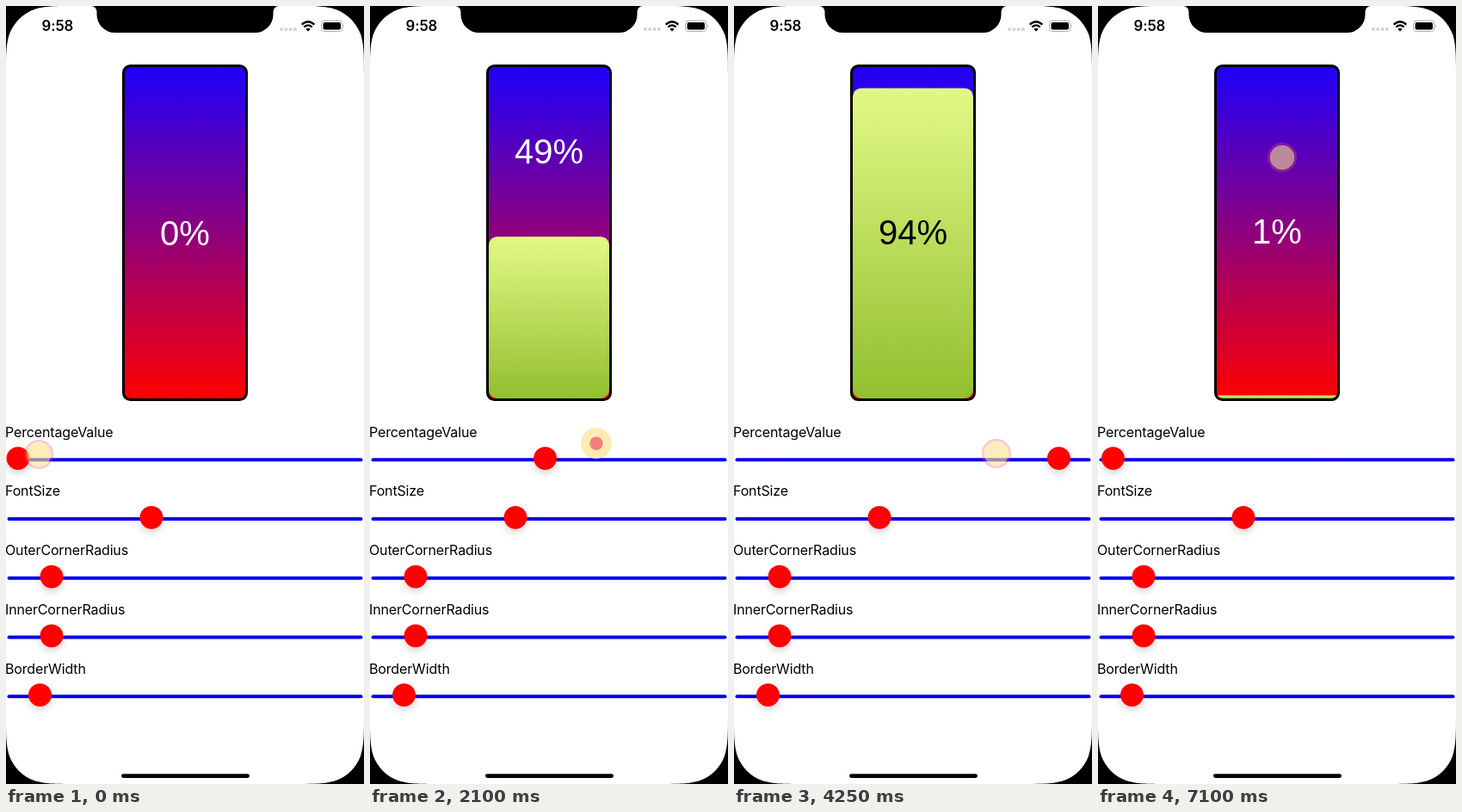
An HTML page for the animation above (7.15 s loop, 416 px wide and 904 px high).

```html
<!DOCTYPE html>
<html lang="en">
<head>
<meta charset="utf-8">
<title>Percentage slider</title>
<style>
html, body { margin: 0; width: 100%; height: 100%; overflow: hidden; background: #fff; }
svg { display: block; width: 416px; height: 904px; }
.label { font: 400 16px Inter, sans-serif; letter-spacing: -0.15px; }
.clock { font: 600 16.8px Inter, sans-serif; letter-spacing: -0.1px; }
#value { font: 400 40px "Liberation Sans", Arial, sans-serif; text-anchor: middle; }
</style>
</head>
<body>
<svg viewBox="0 0 416 904">
  <defs>
    <linearGradient id="back" x2="0" y2="1">
      <stop stop-color="#1e00fa"/><stop offset="1" stop-color="#ff0000"/>
    </linearGradient>
    <linearGradient id="front" x2="0" y2="1">
      <stop stop-color="#e2f985"/><stop offset="1" stop-color="#92bf2f"/>
    </linearGradient>
    <filter id="shadow" x="-60%" y="-60%" width="220%" height="220%">
      <feDropShadow dx="0" dy="4" stdDeviation="4" flood-opacity=".17"/>
    </filter>
    <clipPath id="inside"><rect x="138" y="71" width="140" height="385" rx="6"/></clipPath>
    <path id="corner" d="M0 0H79.500C56.600 0 45.200 0 32.800 3.900C19.400 8.800 8.800 19.400 3.900 32.800C0 45.200 0 56.600 0 79.500Z"/>
  </defs>

  <rect width="416" height="904" fill="#fff"/>
  <use href="#corner"/>
  <use href="#corner" transform="translate(416 0) scale(-1 1)"/>
  <use href="#corner" transform="translate(0 904) scale(1 -1)"/>
  <use href="#corner" transform="translate(416 904) scale(-1 -1)"/>
  <path d="M99 0A6.500 6.500 0 0 1 105.500 6.500V10A21 21 0 0 0 126.500 31H289.500A21 21 0 0 0 310.500 10V6.500A6.500 6.500 0 0 1 317 0Z"/>

  <text class="clock" x="41.500" y="29">9:58</text>
  <g id="signal" fill="#d2d2d2"></g>
  <g fill="none" stroke="#000" stroke-width="2.300">
    <path d="M343.700 21.600Q351 14.800 358.300 21.600"/>
    <path d="M346.300 24.500Q351 20.300 355.700 24.500"/>
  </g>
  <path d="M348.300 26.700Q351 24.600 353.700 26.700L351 29.500Z"/>
  <rect x="366.500" y="17" width="24.500" height="12.500" rx="3.600" fill="none" stroke="#aaa"/>
  <rect x="368.500" y="19" width="20.500" height="8.500" rx="2"/>
  <path d="M392.300 21.200Q394 23.200 392.300 25.300Z" fill="#aaa"/>

  <rect x="136.500" y="69.500" width="143" height="388" rx="8" fill="url(#back)"/>
  <g clip-path="url(#inside)"><rect id="fill" x="138" width="140" fill="url(#front)"/></g>
  <rect x="136.500" y="69.500" width="143" height="388" rx="8" fill="none" stroke="#000" stroke-width="3"/>
  <text id="value" x="208"></text>

  <g id="sliders"></g>
  <rect x="134" y="892.300" width="149" height="4.600" rx="2.300"/>

  <g id="touch">
    <circle id="disc" fill="rgb(250,225,140)"/>
    <circle id="ring" fill="none" stroke="rgb(240,85,110)"/>
  </g>
</svg>
<script>
const LOOP = 7150;
const TOP = 71, BOTTOM = 456;

const $ = id => document.getElementById(id);
const clamp = (v, low, high) => Math.min(high, Math.max(low, v));
const smooth = k => k * k * (3 - 2 * k);
const mix = (a, b, k) => a + (b - a) * k;

const set = (node, attrs) => {
  for (const key in attrs) node.setAttribute(key, attrs[key]);
  return node;
};
const add = (parent, name, attrs) =>
  $(parent).appendChild(set(document.createElementNS("http://www.w3.org/2000/svg", name), attrs));

for (let i = 0; i < 4; i++) add("signal", "circle", { cx: 320 + 5.3 * i, cy: 27, r: 2.1 });

const thumbs = [
  ["PercentageValue", 14], ["FontSize", 169], ["OuterCornerRadius", 53],
  ["InnerCornerRadius", 53], ["BorderWidth", 39.5]
].map(([name, x], i) => {
  const y = 68.75 * i;
  add("sliders", "text", { class: "label", x: -1, y: 500.5 + y }).textContent = name;
  add("sliders", "rect", { x: 1.5, y: 525.2 + y, width: 413, height: 4, rx: 2, fill: "#0a00ea" });
  return add("sliders", "circle", { cx: x, cy: 525.6 + y, r: 13.4, fill: "#ff0000", filter: "url(#shadow)" });
});

// A slightly accelerating rise, a short hold at 100%, then a steady fall.
function levelAt(t) {
  const s = Math.max(0, t / 1000 - .2);
  const rise = .219 * s + .02 * s * s;
  const fall = Math.max(.009, .937 - .394 * (t - 4250) / 1000);
  return Math.min(rise, fall, 1);
}

// Drag right, lift, drag back left, then flick up and away.
function touchAt(t) {
  const s = t / 1000;
  if (s < 3.3) {
    return { x: 38 + 99.5 * s + 3.6 * s * s, y: 521 - 20 * Math.sin(Math.PI * s / 2.7), cycles: .85 + s / .5 };
  }
  if (s < 3.9) return null;
  const back = Math.min(s, 6.4) - 4.25;
  const flick = smooth(clamp((s - 6.4) / .7, 0, 1));
  return {
    x: mix(305 - 128 * back, 214, flick),
    y: mix(520 + 12 * back, 176, flick),
    cycles: .85 + (s - 4.25) / .475 + 1
  };
}

function drawTouch(touch) {
  set($("touch"), { visibility: touch ? "visible" : "hidden" });
  if (!touch) return;
  const phase = touch.cycles % 1;
  const outer = 7.7 + 12.9 * phase ** 2;
  const hole = 20 * phase ** 2;
  set($("touch"), { transform: `translate(${touch.x} ${touch.y})` });
  set($("disc"), { r: 18 - 7 * phase ** 4, "fill-opacity": .66 - .1 * phase ** 4 });
  set($("ring"), {
    r: (outer + hole) / 2,
    "stroke-width": Math.max(0, outer - hole),
    "stroke-opacity": .75 - .5 * phase
  });
}

function draw(t) {
  const level = levelAt(t);
  const height = (BOTTOM - TOP) * level;
  const top = BOTTOM - height;
  const onFill = level >= .5;
  const middle = onFill ? (top + BOTTOM) / 2 - 13 : (TOP + top) / 2;

  set($("fill"), { y: top, height, rx: height < 20 ? 0 : 10 });
  set($("value"), { y: middle + 14, fill: onFill ? "#000" : "#fff" });
  $("value").textContent = Math.round(level * 100) + "%";
  set(thumbs[0], { cx: 14 + 388 * level });
  drawTouch(touchAt(t));
}

const start = performance.now();
function tick() {
  draw((performance.now() - start) % LOOP);
  requestAnimationFrame(tick);
}
tick();
</script>
</body>
</html>
```
